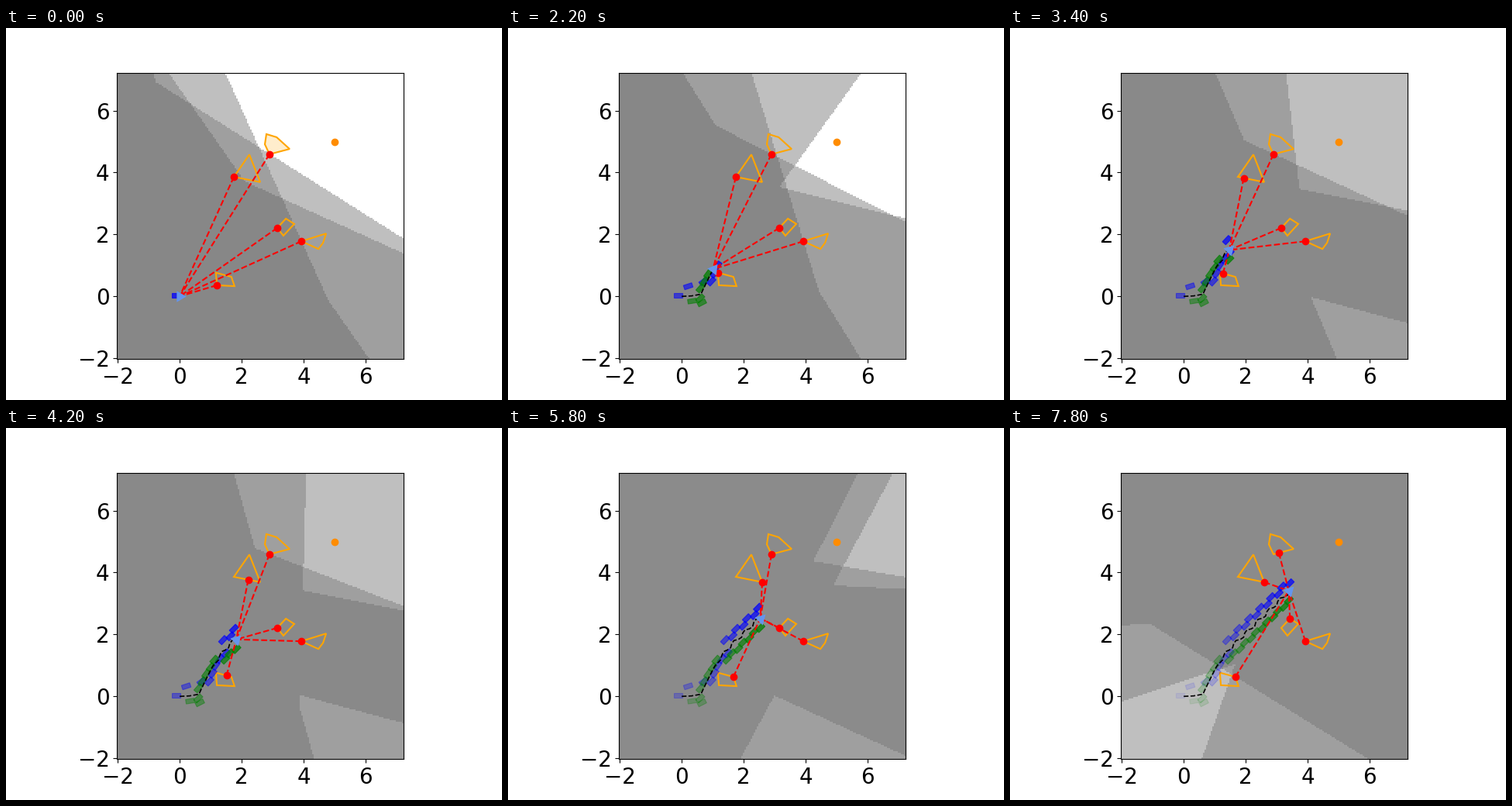
These frames come from a looping animation (640x480 px, 8000 ms). A matplotlib script:

```python
import numpy as np
import matplotlib.pyplot as plt
from matplotlib.animation import FuncAnimation
from matplotlib.patches import Polygon

FRAMES, INTERVAL = 40, 200
STEP = 0.05                            # size of one shading cell
GRID = np.arange(-2, 7.2 + STEP / 2, STEP)
LOW, HIGH = GRID[0] - STEP / 2, GRID[-1] + STEP / 2
GX, GY = np.meshgrid(GRID, GRID)

OBSTACLES = [np.array(p) for p in (
    [(1.75, 3.86), (2.25, 4.58), (2.60, 3.69)],
    [(2.80, 5.24), (3.13, 5.14), (3.55, 4.76), (2.90, 4.59), (2.75, 4.91)],
    [(3.15, 2.21), (3.43, 2.51), (3.70, 2.34), (3.35, 1.96)],
    [(3.93, 1.78), (4.73, 2.03), (4.63, 1.73), (4.48, 1.53)],
    [(1.17, 0.765), (1.67, 0.63), (1.77, 0.33), (1.20, 0.36)],
)]

# Walk: a few way points, with a sideways sway once the gait is regular
k = np.arange(FRAMES)
KEYS = [0, 2, 4, 6, 11, 17, 39]
ANGLE = np.radians(np.interp(k, [0, 5, 10, 17], [0, 45, 55, 45]))
AHEAD = np.column_stack([np.cos(ANGLE), np.sin(ANGLE)])
LEFT = np.column_stack([-np.sin(ANGLE), np.cos(ANGLE)])
sway = 0.054 * np.cos(np.pi * k / 2 + 0.48) * np.clip((k - 11) / 5, 0, 1)
BODY = np.column_stack([
    np.interp(k, KEYS, [0, 0.32, 0.62, 0.72, 1.013, 1.456, 3.411]),
    np.interp(k, KEYS, [0, 0.015, 0.07, 0.283, 0.878, 1.515, 3.393]),
]) + LEFT * sway[:, None]

# Left foot on even steps, right foot on odd ones
side = np.where(k % 2, -1, 1)
reach = 0.045 + 0.265 * side * np.interp(k, [0, 3, 4], [-0.6, 0, 1])
width = side * np.interp(k, [0, 2, 4, 6, 15, 16],
                         [0.04, 0.33, 0.28, -0.04, -0.04, 0.22])
FEET = BODY + AHEAD * reach[:, None] + LEFT * width[:, None]


def foot_corners(i, length=0.28, breadth=0.145):
    a, b = AHEAD[i] * length / 2, LEFT[i] * breadth / 2
    return FEET[i] + [a + b, b - a, -a - b, a - b]


def closest_point(poly, p):
    d = np.roll(poly, -1, axis=0) - poly
    t = np.clip(((p - poly) * d).sum(1) / (d * d).sum(1), 0, 1)
    q = poly + t[:, None] * d
    return q[np.argmin(((q - p) ** 2).sum(1))]


def shade(p, contacts):
    """Stack the half-planes on the walker's side of every contact."""
    count = np.zeros(GX.shape, int)
    for c in contacts:
        n = c - p
        count += (GX - c[0]) * n[0] + (GY - c[1]) * n[1] <= 0
    tone = (128 + 127 * 0.5 ** count) / 255
    deep = count >= 3
    if deep.any():
        tone[deep] = tone[deep].mean()
    return np.dstack([tone, tone, tone, (count > 0).astype(float)])


fig, ax = plt.subplots(figsize=(6.4, 4.8), dpi=100)
image = ax.imshow(np.zeros(GX.shape + (4,)), origin="lower", zorder=1,
                  extent=(LOW, HIGH, LOW, HIGH), interpolation="nearest")
ax.set(xlim=(LOW, HIGH), ylim=(LOW, HIGH), aspect="equal",
       xticks=range(-2, 7, 2), yticks=range(-2, 7, 2))
ax.tick_params(labelsize=20)

for poly in OBSTACLES:
    ax.add_patch(Polygon(poly, fc="orange", ec="none", alpha=0.2, zorder=0.5))
    ax.add_patch(Polygon(poly, fill=False, ec="orange", lw=1.5, zorder=2))
ax.plot(5, 5, "o", color="darkorange", zorder=2)

feet = [ax.add_patch(Polygon(foot_corners(i), color="green" if i % 2 else "blue",
                             lw=0.8, zorder=3)) for i in range(FRAMES)]
trail, = ax.plot([], [], "k--", lw=1.2, zorder=4)
rays = [ax.plot([], [], "r--", lw=1.5, zorder=5)[0] for _ in OBSTACLES]
dots, = ax.plot([], [], "ro", zorder=6)
walker, = ax.plot([], [], color="cornflowerblue", ms=12, mew=0, zorder=7)


def draw(n):
    p = BODY[n]
    contacts = np.array([closest_point(poly, p) for poly in OBSTACLES])
    image.set_data(shade(p, contacts))
    for i, foot in enumerate(feet):
        foot.set_visible(i <= n)
        foot.set_alpha(float(np.clip(0.75 - 0.0175 * (n - i), 0, 1)))
    trail.set_data(*BODY[:n + 1].T)
    for ray, c in zip(rays, contacts):
        ray.set_data([c[0], p[0]], [c[1], p[1]])
    dots.set_data(*contacts.T)
    walker.set_data([p[0]], [p[1]])
    walker.set_marker((3, 0, np.degrees(ANGLE[n]) - 90))
    return [image, trail, dots, walker, *rays, *feet]


anim = FuncAnimation(fig, draw, frames=FRAMES, interval=INTERVAL,
                     init_func=lambda: draw(0), repeat=True, repeat_delay=0)
plt.show()
```
